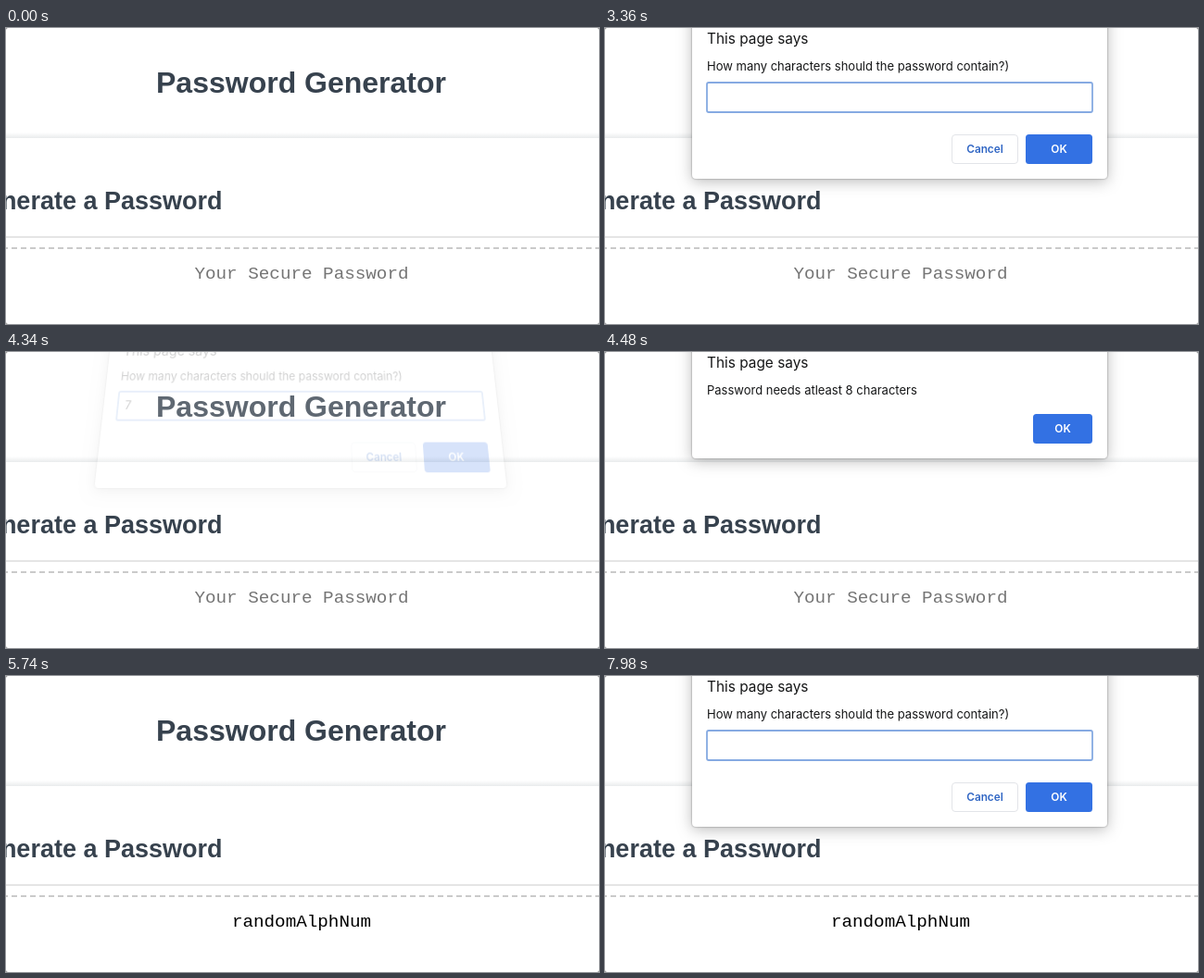
An HTML page for the animation above (8000 ms loop, 640 by 320 pixels).

```html
<!DOCTYPE html>
<html lang="en">
<head>
<meta charset="utf-8">
<title>Password Generator</title>
<style>
  html, body { margin: 0; width: 100%; height: 100%; overflow: hidden; background: #8a8a8a; }
  svg { position: absolute; left: 0; top: 0; width: 640px; height: 320px; }
  .heading { font-family: "Liberation Sans", Arial, sans-serif; font-weight: bold; fill: #37424e; }
  #result { font: 19.25px "Liberation Mono", "Courier New", monospace; text-anchor: middle; }
  #dialog { overflow: visible; font: 13px Inter, "Open Sans", sans-serif; fill: #151617; }
  .panel { fill: #fff; filter: drop-shadow(0 0 1px rgba(0,0,0,.4)) drop-shadow(0 3px 8px rgba(0,0,0,.26)); }
  .says { font-size: 15.4px; }
  .label { font-size: 11.8px; font-weight: 600; text-anchor: middle; }
</style>
</head>
<body>
<svg id="page" viewBox="0 0 640 320">
  <defs>
    <linearGradient id="edge" x2="0" y2="1">
      <stop offset="0" stop-color="#e9ebec" stop-opacity="0"/>
      <stop offset="1" stop-color="#e9ebec"/>
    </linearGradient>
  </defs>
  <rect width="640" height="320" rx="2.5" fill="#fff"/>
  <rect y="113" width="640" height="6" fill="url(#edge)"/>
  <text class="heading" x="318.5" y="70" font-size="32" text-anchor="middle">Password Generator</text>
  <text class="heading" x="233.5" y="196" font-size="27" text-anchor="end">Generate a Password</text>
  <path d="M0 226H640" stroke="#dcdcdc" stroke-width="1.5"/>
  <path d="M0 238H640" stroke="#b9b9b9" stroke-width="1.5" stroke-dasharray="6 4" stroke-dashoffset="4"/>
  <text id="result" x="319" y="271"></text>
</svg>

<svg id="dialog" viewBox="0 0 640 320">
  <g id="prompt">
    <rect class="panel" x="94" y="-40" width="448" height="203" rx="4"/>
    <text class="says" x="110" y="17">This page says</text>
    <text x="110" y="46">How many characters should the password contain?)</text>
    <rect x="110" y="59" width="416" height="32" rx="2" fill="#fff" stroke="#86aae2" stroke-width="1.8"/>
    <text id="typed" x="118" y="79"></text>
    <rect id="caret" y="67" width="1.2" height="15" fill="#111"/>
    <rect x="374.5" y="115.5" width="71" height="31" rx="3.5" fill="#fff" stroke="#e2e4e8"/>
    <text class="label" x="410" y="135" fill="#3066c4">Cancel</text>
    <rect class="ok" x="454" y="115" width="72" height="32" rx="3.5"/>
    <text class="label" x="490" y="135" fill="#fff">OK</text>
  </g>
  <g id="alert">
    <rect class="panel" x="94" y="-40" width="448" height="155" rx="4"/>
    <text class="says" x="110" y="17">This page says</text>
    <text x="110" y="46">Password needs atleast 8 characters</text>
    <rect class="ok" x="462" y="67" width="64" height="32" rx="3.5"/>
    <text class="label" x="494" y="87" fill="#fff">OK</text>
  </g>
</svg>

<script>
const LOOP = 8000, STEP = 70;
const $ = id => document.getElementById(id);
const [result, dialog, typed, caret] = ["result", "dialog", "typed", "caret"].map($);

// Each opening of a dialog; closing runs over two steps.
const openings = [
  { id: "prompt", from: 1820, close: 4270, press: 4060, typeAt: 3430 },
  { id: "alert", from: 4410, close: 5250, press: 5040 },
  { id: "prompt", from: 6440, close: Infinity, press: Infinity, typeAt: Infinity }
];
const bottoms = { prompt: 163, alert: 115 };
const idle = [51, 113, 227], pressed = [85, 129, 207];

const show = (node, on) => node.setAttribute("visibility", on ? "inherit" : "hidden");
const mix = (a, b, k) => `rgb(${a.map((v, i) => Math.round(v + (b[i] - v) * k))})`;

function poseClosing(k, bottom) {
  dialog.style.opacity = 1 - k;
  dialog.style.transformOrigin = `318px ${bottom}px`;
  dialog.style.transform = k
    ? `perspective(200px) translateY(${-20 * k}px) rotateX(${7.2 * k}deg) scale(${1 - 0.008 * k}, ${1 + 0.09 * k})`
    : "none";
}

function drawDialog(t) {
  const open = openings.find(o => t >= o.from && t < o.close + 2 * STEP);
  dialog.style.visibility = open ? "visible" : "hidden";
  for (const id in bottoms) show($(id), open && open.id === id);
  if (!open) return;

  const closing = t >= open.close;
  poseClosing(closing ? 0.37 + 0.43 * (t - open.close) / STEP : 0, bottoms[open.id]);

  const press = !closing && t >= open.press ? Math.min(1, (t - open.press + STEP) / (2 * STEP)) : 0;
  $(open.id).querySelector(".ok").setAttribute("fill", mix(idle, pressed, press));

  if (open.id === "prompt") {
    const hasText = t >= open.typeAt;
    const age = t - (hasText ? open.typeAt : open.from);
    typed.textContent = hasText ? "7" : "";
    caret.setAttribute("x", hasText ? 125.5 : 117.9);
    show(caret, hasText ? age < 560 : age % 1050 < 490);
  }
}

function draw(ms) {
  const t = Math.floor(ms % LOOP / STEP) * STEP;
  const done = t >= 5250;
  result.textContent = done ? "randomAlphNum" : "Your Secure Password";
  result.setAttribute("fill", done ? "#000" : "#757575");
  drawDialog(t);
}

const start = performance.now();
function tick() {
  draw(performance.now() - start);
  requestAnimationFrame(tick);
}
tick();
</script>
</body>
</html>
```
